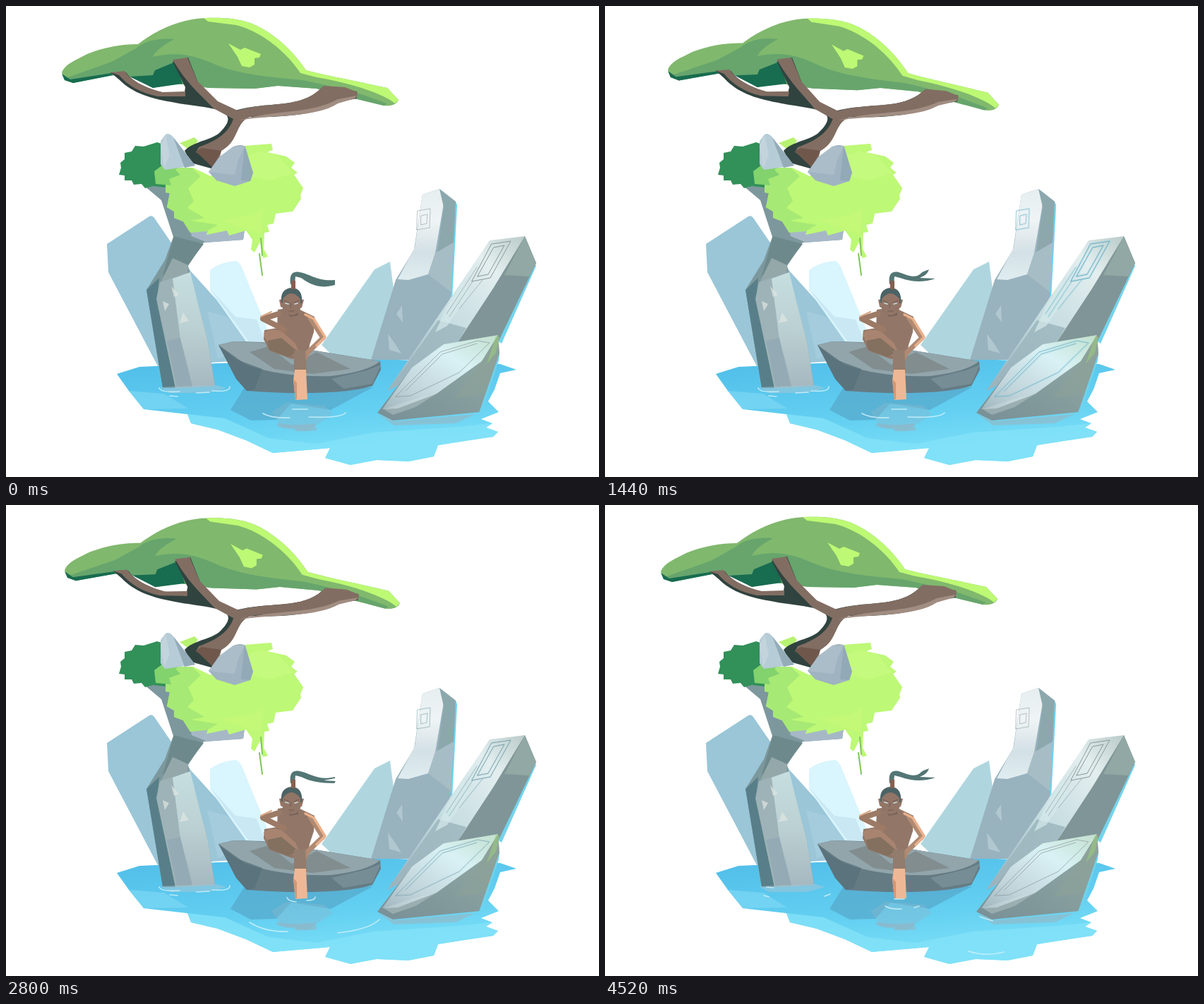
Write an HTML page that moves like this. It is 840x667 px and loops after 4.85 s.

```html
<!DOCTYPE html>
<html lang="en">
<head>
<meta charset="utf-8">
<title>Spirit pool</title>
<style>
html, body { margin: 0; width: 100%; height: 100%; overflow: hidden; background: #fff; }
svg { display: block; width: 100%; height: 100%; }
.ripple, .line { fill: none; stroke-linecap: round; stroke-linejoin: round; }
.ripple { stroke: #d3f3fb; stroke-width: 1.7; opacity: .8; }
</style>
</head>
<body>
<svg viewBox="0 0 840 667">
<defs>
  <linearGradient id="sea" x1="0" y1="0" x2=".35" y2="1">
    <stop offset="0" stop-color="#50bde9"/><stop offset=".6" stop-color="#63cff1"/><stop offset="1" stop-color="#7ce0f8"/>
  </linearGradient>
  <linearGradient id="tall" x1="0" y1="0" x2="0" y2="1">
    <stop offset="0" stop-color="#e6eef0"/><stop offset=".35" stop-color="#eff4f5"/><stop offset=".7" stop-color="#d3e0e5"/><stop offset="1" stop-color="#e0edf0"/>
  </linearGradient>
  <linearGradient id="lean" x1="1" y1="0" x2="0" y2="1">
    <stop offset="0" stop-color="#b9cbc8"/><stop offset=".22" stop-color="#e3eeef"/><stop offset=".55" stop-color="#c6dde1"/><stop offset="1" stop-color="#97b1bc"/>
  </linearGradient>
  <linearGradient id="slab" x1="1" y1="0" x2="0" y2="1">
    <stop offset="0" stop-color="#c2e0cd"/><stop offset=".35" stop-color="#d9f1f5"/><stop offset=".75" stop-color="#c0d3d9"/><stop offset="1" stop-color="#9fb6be"/>
  </linearGradient>
  <linearGradient id="dark" x1="1" y1="0" x2="0" y2="1">
    <stop offset="0" stop-color="#93aba4"/><stop offset="1" stop-color="#788f96"/>
  </linearGradient>
  <linearGradient id="column" x1="0" y1="0" x2="0" y2="1">
    <stop offset="0" stop-color="#c6dedf"/><stop offset=".5" stop-color="#bbd0d2"/><stop offset="1" stop-color="#a5b8c0"/>
  </linearGradient>
</defs>

<!-- water -->
<path fill="url(#sea)" d="M157,521 L189,511 L300,506 L530,500 L700,507 L723,515 L700,520 L692,543 L683,560 L698,575 L673,585 L689,591 L680,597 L697,603 L690,610 L650,616 L612,622 L606,638 L570,645 L525,643 L488,650 L452,640 L459,626 L378,633 L340,615 L300,600 L262,591 L257,578 L195,571 L174,545Z"/>
<path fill="#82e2f8" d="M257,578 L310,584 L372,612 L440,620 L520,604 L640,596 L689,591 L680,597 L697,603 L690,610 L650,616 L612,622 L606,638 L570,645 L525,643 L488,650 L452,640 L459,626 L378,633 L340,615 L300,600 L262,591Z" opacity=".85"/>
<path fill="#83daf5" d="M174,545 L224,549 L258,570 L195,571Z" opacity=".6"/>

<!-- distant rocks -->
<path fill="#9ac6d8" d="M143,337 L203,298 Q207,296 210,300 L262,376 L350,473 L365,500 L215,510 L145,377Z"/>
<path fill="#b0d3e3" d="M285,432 L313,440 L355,478 L300,500Z" opacity=".45"/>
<path fill="#d9f5fe" d="M289,374 Q302,363 325,361 Q331,362 335,372 L378,477 L340,475 L289,403Z"/>
<path fill="#c5e4f0" d="M289,400 L325,440 L355,444 L367,475 L345,477Z" opacity=".75"/>
<path fill="#afd6df" d="M447,480 L522,373 L544,362 L549,400 L518,502 L470,502Z"/>

<!-- tall stone -->
<path fill="#6ed4ed" d="M637,277 L639,282 L632,415 L628,410Z"/>
<path fill="#98b2be" d="M517,501 L552,388 L578,345 L590,267 L614,259 L637,277 L630,412 L622,440 L600,501Z"/>
<path fill="url(#tall)" d="M555,387 L579,342 L590,267 L614,259 L622,268 L608,350 L598,380 L570,388Z"/>
<path fill="#8ca8ad" d="M614,259 L637,277 L634,335 L611,350 L620,285Z"/>
<path fill="#a7bdc5" d="M608,350 L634,335 L630,405 L598,380Z"/>
<path fill="#bdd0d8" d="M541,464 L551,478 L560,492 L543,487Z M553,436 L561,424 L562,448Z" opacity=".7"/>

<!-- leaning stone -->
<path fill="#73d4ed" d="M749,365 L751,368 L702,478 L696,474Z"/>
<path fill="url(#lean)" d="M685,332 L735,326 L650,474 L590,520 L540,545 L626,419Z"/>
<path fill="#809597" d="M735,326 L751,364 L698,474 L640,476 L690,400Z"/>
<path fill="#91a8a4" d="M735,326 L751,364 L741,383 L706,381Z"/>
<path fill="#9bb4bd" d="M612,445 L652,456 L640,476 L580,525 L545,540Z" opacity=".8"/>
<path fill="#d6eaec" d="M625,425 L648,389 L656,408 L625,453 L608,462Z" opacity=".7"/>

<!-- front slab -->
<path fill="url(#dark)" d="M526,576 L575,512 L620,479 L697,466 L699,493 L671,575 L548,587Z"/>
<path fill="url(#slab)" d="M533,571 L575,512 L620,479 L697,466 L674,503 L610,549 L555,570Z"/>
<path fill="#8ba098" d="M697,466 L699,493 L680,548 L636,555 L674,503Z" opacity=".75"/>
<path fill="#9dd078" d="M694,467 L699,469 L694,491 L681,507Z" opacity=".5"/>
<path fill="#d9e8e9" d="M535,571 L577,557 L610,549 L580,568 L548,579Z" opacity=".3"/>
<path fill="#6fd2ed" d="M699,492 L698,502 L674,576 L670,576Z"/>
<path fill="#94b9c6" d="M527,578 L551,588 L665,578 L637,591 L550,594Z" opacity=".65"/>

<g id="glow" class="line" stroke="#7fd3e6" stroke-width="3.5" opacity="0"><use href="#runes"/></g>
<g class="line" id="ink" stroke-width="1"><g id="runes">
  <path opacity=".55" d="M588,297 L597,295 L596,308 L588,310Z M583,290 L601,287 L600,314 L582,317Z"/>
  <path d="M688,337 L715,333 L686,385 L660,390Z M691,342 L706,339 L683,380 L668,383Z"/>
  <path opacity=".6" d="M667,370 L624,436 M661,390 L628,440 M675,388 L642,429"/>
  <path opacity=".7" d="M552,553 L615,490 L668,474 L685,477 L642,519 L573,552Z M566,545 L618,493 L667,478"/>
</g></g>

<!-- stone column -->
<path fill="#7d989d" d="M195,254 L230,256 L262,300 L338,317 L336,331 L280,335 L258,368 L264,393 L286,475 L296,538 L222,541 L199,402 L225,360 L237,327 L220,275Z"/>
<path fill="#a6b8c6" d="M258,303 L338,316 L336,331 L285,335 L263,326Z"/>
<path fill="#6e898b" d="M238,326 L280,337 L258,366 L222,382Z"/>
<path fill="#94a8aa" d="M236,357 L258,367 L257,386 L220,390Z"/>
<path fill="#587f89" d="M199,402 L217,385 L214,415 L240,541 L222,541Z"/>
<path fill="#9eb3b7" d="M218,391 L240,384 L249,472 L264,540 L240,541 L213,415Z"/>
<path fill="url(#column)" d="M236,386 L261,377 L270,414 L286,475 L296,538 L264,540 L247,472Z"/>
<path fill="#91a9b5" d="M228,474 L247,470 L264,538 L242,540Z" opacity=".7"/>
<path fill="#e0e7e3" d="M234,397 L245,409 L238,412Z M251,434 L259,446 L246,449Z M222,418 L231,422 L225,432Z" opacity=".7"/>
<path fill="#a4c7d6" d="M218,540 L298,537 L312,541 L286,548 L232,548Z" opacity=".55"/>

<!-- foliage behind the trunk -->
<path fill="#329059" d="M160,239 L163,229 L162,222 L168,217 L168,208 L178,206 L183,198 L195,199 L214,193 L235,200 L240,248 L226,257 L208,255 L197,258 L192,252 L181,253 L178,247 L168,247 L168,240Z"/>
<path fill="#b7f272" d="M246,194 L267,186 L272,191 L261,205Z"/>

<!-- canopy -->
<path class="canopy" fill="#80b86d" d="M79,94 C84,82 98,77 115,68 C140,58 165,54 187,54 C210,36 245,18 283,17 C330,15 350,24 368,35 C395,52 412,72 425,91 C450,98 500,107 540,116 L556,133 C553,140 545,142 535,141 L498,132 L470,126 L440,117 L385,113 L352,117 L288,116 L243,110 L208,116 L180,100 L150,98 L95,109 L83,105Z"/>
<path class="canopy" fill="#67a56d" d="M82,103 L150,79 L184,60 C195,50 215,45 238,47 C226,54 211,63 208,72 C240,65 262,68 292,81 C330,98 380,101 420,105 L500,121 L540,138 L535,141 L498,132 L440,117 L385,113 L352,117 L288,116 L243,110 L208,112 L180,100 L150,98 L95,109Z"/>
<path class="canopy" fill="#80b86d" d="M430,99 L498,111 L537,127 L540,138 L494,122 L427,106Z"/>
<path class="canopy" fill="#186c50" d="M79,96 L91,104 L149,95 L152,98 L95,109 L83,105Z M175,100 L208,98 L211,91 L240,79 L250,110 L208,116Z"/>
<path class="canopy" fill="#bdf974" d="M280,17 C330,15 350,24 368,35 C395,52 412,72 425,91 C450,98 500,107 540,116 L556,133 L551,138 C540,128 500,111 440,101 L417,95 C398,66 364,37 326,27 L286,22Z"/>
<path class="canopy" fill="#bdf974" d="M315,53 L332,62 L338,59 L361,68 L359,73 L352,74 L352,83 L345,87 L334,85 L328,72Z"/>

<!-- trunk -->
<path class="branch" fill="#30433f" d="M148,94 L170,94 C178,106 195,114 215,121 L252,128 L254,115 L236,79 L258,73 L272,108 L300,136 L325,148 C370,135 410,145 440,122 L450,114 L497,121 L497,131 L470,136 C440,156 380,158 345,157 C325,165 330,190 305,205 L290,218 L294,231 L262,222 L253,205 C265,192 290,190 302,180 C318,165 318,155 305,149 C290,143 260,141 240,137 C205,131 180,124 160,104Z"/>
<path class="branch" fill="#826d62" d="M148,94 L168,92 C176,106 200,117 222,122 L254,121 L254,128 L215,128 C190,123 172,112 160,98Z"/>
<path class="branch" fill="#826d62" d="M236,76 L257,73 L271,106 L300,135 L328,148 C370,135 410,145 440,122 L450,113 L480,115 L498,122 L497,130 L470,134 C440,153 380,151 345,157 C322,168 332,190 305,205 L300,226 L269,207 L273,200 C300,190 315,180 322,160 L294,145 C274,124 256,110 236,76Z"/>
<path class="branch" fill="#a18d82" d="M330,162 C380,146 430,154 470,132 L496,127 L494,131 L470,138 C440,158 380,154 336,161Z"/>
<path fill="#6f574c" d="M269,206 L277,201 L305,205 L293,229Z"/>

<!-- foliage in front -->
<path fill="#bdf876" d="M226,244 L240,230 L265,229 L290,241 L316,208 L325,199 L376,195 L378,204 L370,207 L397,213 L409,222 L404,229 L413,236 L408,239 L421,258 L417,268 L418,273 L406,291 L382,294 L379,308 L370,310 L373,320 L366,321 L365,344 L371,355 L364,357 L360,334 L352,349 L347,345 L349,331 L340,318 L316,325 L313,318 L284,324 L286,317 L261,321 L251,305 L238,300 L238,291 L228,285 L232,265 L226,264Z"/>
<path fill="#a7e975" d="M226,244 L238,229 L263,229 L276,241 L258,258 L266,276 L257,286 L281,300 L262,304 L300,310 L284,319 L261,321 L251,305 L238,300 L238,291 L228,285 L232,265 L226,264Z"/>
<path fill="#82d26d" d="M210,234 L226,222 L249,225 L240,232 L247,239 L231,245 L234,254 L212,252Z"/>
<path fill="#c8fb81" d="M337,213 L361,205 L386,212 L407,237 L374,247 L345,241Z" opacity=".7"/>
<path fill="#c8f878" d="M302,303 L349,296 L365,286 L362,322 L341,317Z" opacity=".65"/>
<path class="line" stroke="#7fc65c" stroke-width="2" d="M361,329 L363,353 M359,351 L363,381"/>
<path fill="#b6ccd7" d="M219,191 L226,182 Q231,179 237,186 L268,226 L225,232 L219,224Z"/>
<path fill="#94abb8" d="M237,186 L268,226 L253,229Z"/>
<path fill="#d0dce2" d="M219,198 L226,183 L232,211 L224,230Z" opacity=".5"/>
<path fill="#9fb3c1" d="M287,235 L302,214 L322,199 Q333,195 339,199 L350,236 L346,248 L324,255 L298,247Z"/>
<path fill="#b1c2cd" d="M287,235 L302,214 L322,199 L338,199 L329,218 L324,239Z" opacity=".7"/>
<path fill="#8ba2b1" d="M338,199 L350,236 L346,248 L333,247Z" opacity=".6"/>

<!-- reflections and seat -->
<path fill="#56a9cb" d="M338,540 L318,572 L347,587 L383,586 L404,563 L460,572 L520,540Z" opacity=".7"/>
<path fill="#88b6cb" d="M376,575 L397,562 L451,566 L463,578 L427,602 L392,598Z" opacity=".4"/>
<path class="line" stroke="#9caebb" stroke-width="5" d="M386,593 Q405,598 436,594 M412,600 L438,599" opacity=".5"/>
<path fill="#657b84" d="M301,480 L322,475 L365,476 L450,490 L530,503 L531,515 L519,538 C480,550 405,550 341,545 L326,528Z"/>
<path fill="#91a5ab" d="M301,480 L322,475 L375,477 L450,490 L530,503 Q512,518 461,524 Q390,526 340,508Z"/>
<path fill="#7f8a8b" d="M345,490 L372,482 L405,508 L440,490 L488,514 L434,521 L380,514Z" opacity=".85"/>
<path fill="#57707a" d="M301,480 L325,500 L363,514 L352,543 L341,545 L326,528Z" opacity=".75"/>
<path fill="#829aa1" d="M461,528 L511,516 L531,508 L519,535 L478,542Z" opacity=".6"/>

<!-- figure -->
<path fill="#927768" d="M385,430 L398,428 L414,429 L437,440 L436,462 L430,480 L428,495 L405,500 L373,488 L365,472 L366,459 L384,456Z"/>
<path fill="#a88470" d="M365,464 Q374,455 391,461 L410,478 L418,497 L401,494 L371,479Z"/>
<path fill="#83705f" d="M370,474 L390,470 L414,490 L400,497 L373,487Z"/>
<path class="line" stroke="#9c7a66" stroke-width="8" d="M386,436 L364,443 L394,458"/>
<path class="line" stroke="#b08a72" stroke-width="7" d="M431,442 L449,470 L426,492 L421,504"/>
<path class="line" stroke="#eab18c" stroke-width="3.5" d="M424,437 L436,443 L452,469 L440,481"/>
<path class="line" stroke="#d9a584" stroke-width="2" d="M361,440 L376,433"/>
<path fill="#927c6e" d="M408,488 L424,487 L426,520 L408,520Z"/>
<path fill="#eeb896" d="M409,515 L425,515 L427,557 L410,558 L407,530Z"/>
<path fill="#cf9879" d="M407,528 L412,534 L412,557 L410,557Z"/>
<path fill="#75615a" d="M397,430 L413,430 L414,438 L402,440Z"/>
<path fill="#967668" d="M387,416 L392,415 L393,428 L389,426Z M417,415 L422,416 L419,427 L416,428Z"/>
<path fill="#4c6365" d="M390,420 Q388,400 405,399 Q421,400 419,421Z"/>
<path fill="#917567" d="M392,415 Q404,399 417,415 L417,429 Q413,438 404,438 Q395,437 392,429Z"/>
<path class="line" stroke="#755b50" stroke-width="1" d="M394,417 L401,420 M408,420 L415,417 M404,421 L403,427 M401,432 L408,432"/>
<path id="eyes" class="line" stroke="#c8dde0" stroke-width="1.8" d="M396,421 L400,422 M409,422 L413,421"/>
<path id="hair" fill="#537674"/>
<path fill="#86604f" d="M404,389 L410,389 L410,401 L404,401Z"/>

<g class="ripple" id="ripples"></g>
</svg>
<script>
const $ = id => document.getElementById(id);
const LOOP = 4850, STEP = 80, SLOW = 250 / 3;
const clamp = v => Math.max(0, Math.min(1, v));

// Canopy poses: offsets of the left tip and the right tip
const rest = [0, 0, 0, 0], mid = [4, -2, 2, 6], up = [10, -4, 2, 7], gust = [9, -7, 4, 15];
const sway = [[0, rest], [8, mid], [11, up], [27, gust], [31, up], [34, mid], [38, rest]];

const root = 'M403,394 C401,380 406,375 416,377 ';
const tail = ' L410,383 L409,394Z';
const droop = root + 'C432,380 441,390 466,388 L466,395 C442,402 428,392 418,385' + tail;
const fork = root + 'C432,380 442,391 466,385 L466,387 L450,390 L467,391 L465,394 C444,394 430,391 418,385' + tail;
const flick = root + 'C431,381 446,382 454,368 L456,370 C452,377 450,380 446,382 L465,379 C458,390 440,395 418,385' + tail;
const curl = root + 'C428,381 438,386 446,380 C451,375 455,375 459,373 C457,379 453,382 446,385 L468,386 C453,391 437,392 418,385' + tail;
const hairCycle = [flick, flick, curl, fork, curl];

const wide = 'M217,541 Q220,548 246,546 M270,548 L288,547 M292,545 Q318,547 317,539 M232,552 L243,553 ';
const small = 'M225,553 L232,555 M311,554 L319,551 M229,541 L239,542 ';
const large = wide + 'M364,577 Q376,584 402,583 M429,582 Q474,584 481,576 M406,571 L427,571';
const ripples = [
  large,
  wide + 'M398,556 Q400,561 411,562 M426,560 Q438,560 438,555 M345,591 Q367,605 399,604 M470,606 Q515,601 529,587',
  small + 'M386,573 Q391,578 412,576 M439,577 Q455,574 454,570 M330,586 Q331,600 379,613 M450,613 Q489,613 498,605',
  large,
  wide + 'M402,559 Q400,566 415,566 M428,565 Q441,562 435,559 M350,597 Q355,610 373,615 M492,616 Q522,612 527,597 M528,581 L548,588',
  small + 'M397,568 Q405,573 420,572 M438,570 L445,568 M410,558 L424,558 M515,632 Q540,640 565,633 M531,583 L549,589'
];

const leaves = [...document.querySelectorAll('.canopy, .branch')].map(el => ({
  el, d: el.getAttribute('d'), limb: el.classList.contains('branch')
}));

function bend(d, [lx, ly, rx, ry], limb) {
  return d.replace(/([\d.]+),([\d.]+)/g, (_, a, b) => {
    const x = +a, y = +b, u = (x - 79) / 476;
    const w = limb ? clamp((165 - y) / 45) : 1;
    return (x + w * (lx + (rx - lx) * u)).toFixed(1) + ',' + (y + w * (ly + (ry - ly) * u)).toFixed(1);
  });
}

function draw(n) {
  const pose = sway.filter(k => k[0] <= n).pop()[1];
  for (const { el, d, limb } of leaves) el.setAttribute('d', bend(d, pose, limb));

  const beat = Math.floor(n / 4);
  $('hair').setAttribute('d', beat ? hairCycle[beat % 5] : droop);
  $('eyes').style.opacity = n >= 12 && n <= 14 ? 0 : 1;

  const glow = Math.min(clamp((n - 1) / 11), clamp((40 - n) / 12));
  const mix = (a, b) => Math.round(a + (b - a) * glow);
  $('glow').setAttribute('opacity', glow * .22);
  $('ink').setAttribute('stroke', `rgb(${mix(139, 110)},${mix(151, 172)},${mix(153, 190)})`);

  $('ripples').innerHTML = `<path d="${ripples[Math.floor(n / 5) % 6]}"/>`;
}

let last = -1;
function tick() {
  const t = performance.now() % LOOP;
  const n = Math.floor(t < 3600 ? t / STEP : 45 + (t - 3600) / SLOW);
  if (n !== last) draw(n);
  last = n;
  requestAnimationFrame(tick);
}
tick();
</script>
</body>
</html>
```
